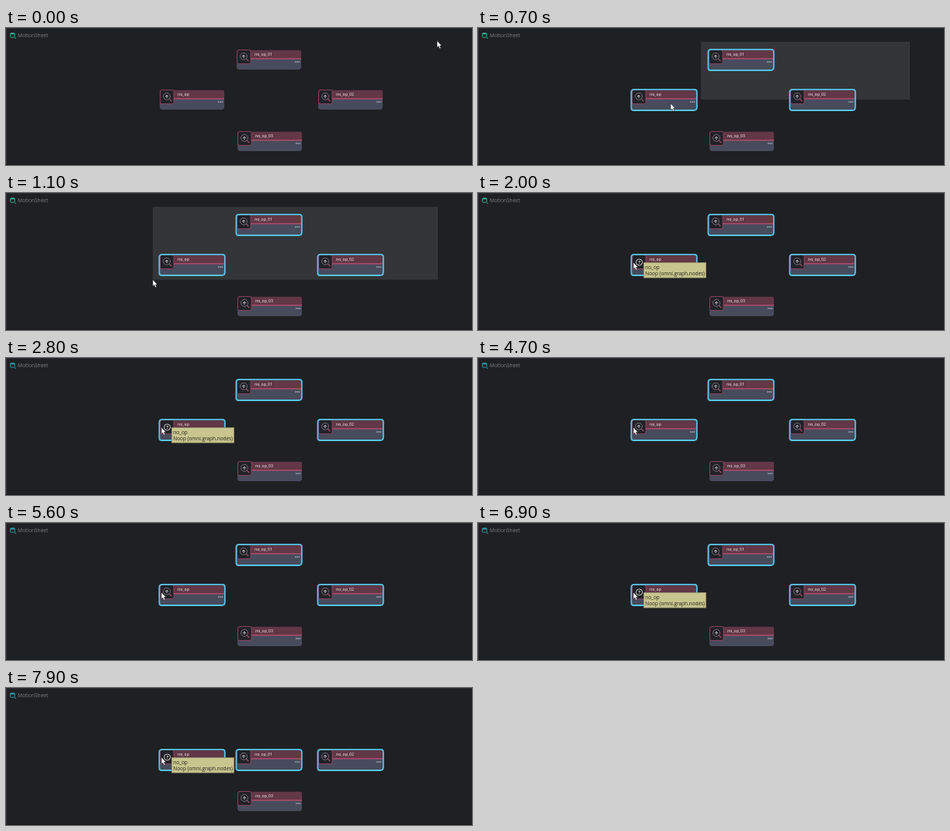
These frames come from a looping animation (600 by 178 pixels, 8000 ms). An HTML page:

```html
<!DOCTYPE html>
<html lang="en">
<head>
<meta charset="utf-8">
<title>Node selection</title>
<style>
  html, body { margin: 0; width: 100%; height: 100%; overflow: hidden; background: #1f2023; }
  svg { display: block; width: 600px; height: 178px; font-family: "Open Sans", sans-serif; }
</style>
</head>
<body>
<svg id="stage" viewBox="0 0 600 178"></svg>
<script>
const LOOP = 8000, STEP = 100;
const stage = document.getElementById('stage');

function add(parent, tag, attrs = {}, text = '') {
  const el = document.createElementNS('http://www.w3.org/2000/svg', tag);
  for (const key in attrs) el.setAttribute(key, attrs[key]);
  el.textContent = text;
  parent.append(el);
  return el;
}

const show = (el, on) => el.setAttribute('visibility', on ? 'visible' : 'hidden');
const move = (el, x, y) => el.setAttribute('transform', `translate(${x} ${y})`);

// Panel frame and title
add(stage, 'rect', { width: 600, height: 178, fill: '#1f2023' });
add(stage, 'rect', { width: 600, height: 1, fill: '#2b2c2f' });
add(stage, 'rect', { width: 1, height: 178, fill: '#353639' });
add(stage, 'rect', { y: 177, width: 600, height: 1, fill: '#18191b' });

const badge = add(stage, 'g', { fill: 'none', stroke: '#2fa58c' });
add(badge, 'rect', { x: 5.6, y: 6.6, width: 5.6, height: 5.6, rx: 1 });
add(badge, 'path', { d: 'M5.6 7.6h5.6', 'stroke-width': 1.6 });
add(badge, 'path', { d: 'M11.4 13.2h1.4', 'stroke-width': 1.4 });
add(stage, 'text', { x: 15, y: 12.1, 'font-size': 6.6, fill: '#7c7e7f' }, 'MotionSheet');

const marquee = add(stage, 'rect', { fill: '#343538' });

function makeNode(name, x, y) {
  const g = add(stage, 'g');
  add(g, 'path', { d: 'M0 12H83V24L81 26H3.5Q0 26 0 22.5Z', fill: '#474b5c' });
  add(g, 'path', { d: 'M2 .7H81Q83 .7 83 2.7V12H0V2.7Q0 .7 2 .7Z', fill: '#623746' });
  add(g, 'rect', { x: 18, y: 11.2, width: 65, height: 1.4, fill: '#b34c6d' });
  add(g, 'path', {
    d: 'M3 .5H16Q18 .5 18 2.5V16.5Q18 18.5 16 18.5H2.5Q.5 18.5 .5 16.5V3Q.5 .5 3 .5Z',
    fill: '#202228', stroke: '#934560', 'stroke-width': 0.9
  });

  const lens = add(g, 'g', { fill: 'none', stroke: '#8d7883' });
  add(lens, 'circle', { cx: 9, cy: 8.8, r: 4.5, 'stroke-width': 0.8 });
  add(lens, 'path', { d: 'M12.3 12.2L15.3 15.2', stroke: '#a5566f', 'stroke-width': 1.2 });
  add(lens, 'path', { d: 'M7.1 9.2L9 7.2L10.9 9.2M9 7.5V11', stroke: '#c9c5ca', 'stroke-width': 1 });

  const help = add(g, 'g');
  add(help, 'circle', { cx: 9.6, cy: 9.9, r: 4, fill: '#17181b', stroke: '#e4e4e6', 'stroke-width': 0.9 });
  add(help, 'text', {
    x: 9.6, y: 12.1, 'font-size': 6, 'font-weight': 700, fill: '#f0f0f0', 'text-anchor': 'middle'
  }, '?');

  add(g, 'text', { x: 23, y: 8.3, 'font-size': 5.1, 'font-weight': 600, fill: '#d3c7cc' }, name);
  for (let i = 0; i < 3; i++)
    add(g, 'rect', { x: 75 + i * 2.3, y: 15.4, width: 1.6, height: 1.3, fill: '#b6b9c4' });

  const ring = add(g, 'path', {
    d: 'M3 -.2H80.5Q83.8 -.2 83.8 2.8V23Q83.8 27 79.8 27H2.4Q-.6 27 -.6 24V3.4Q-.6 -.2 3 -.2Z',
    fill: 'none', stroke: '#55c5ea', 'stroke-width': 1.8
  });
  move(g, x, y);
  show(help, false);
  return { g, lens, help, ring };
}

const top1 = makeNode('no_op_01', 297, 28);
const left = makeNode('no_op', 198, 80);
const right = makeNode('no_op_02', 402, 80);
const low = makeNode('no_op_03', 298, 134);
show(low.ring, false);

const tip = add(stage, 'g');
add(tip, 'rect', { x: 213.4, y: 90.4, width: 80.2, height: 19.7, fill: '#c9c58e', stroke: '#8b8968', 'stroke-width': 0.8 });
for (const [y, line] of [[98.6, 'no_op'], [107.3, 'Noop (omni.graph.nodes)']])
  add(tip, 'text', { x: 215.3, y, 'font-size': 6.43, fill: '#25251d' }, line);

const cursor = add(stage, 'path', {
  d: 'M0 0V8.6L1.9 7L3.3 10.2L4.9 9.5L3.5 6.4H6Z',
  fill: '#fff', stroke: '#15161a', 'stroke-width': 0.5
});

// Pointer path: time, x, y
const path = [
  [0, 555, 16.6], [100, 556, 18], [300, 556, 18], [400, 528, 26], [500, 400, 62],
  [600, 287, 93], [700, 248, 98], [800, 216, 106], [900, 198, 111], [1000, 189, 112.6],
  [1100, 189, 112.6], [1200, 189, 107], [1300, 193, 99], [1400, 198, 92], [1500, 200, 90]
];

function pointer(t) {
  const i = path.findIndex(p => p[0] > t);
  if (i < 0) return path[path.length - 1].slice(1);
  if (i === 0) return path[0].slice(1);
  const [t0, x0, y0] = path[i - 1], [t1, x1, y1] = path[i];
  const k = (t - t0) / (t1 - t0);
  return [x0 + (x1 - x0) * k, y0 + (y1 - y0) * k];
}

function draw(t) {
  const [x, y] = pointer(t);
  move(cursor, x, y);

  // The marquee trails the pointer by one step
  const [mx, my] = pointer(t - STEP);
  show(marquee, t >= 400 && t < 1200);
  marquee.setAttribute('x', mx);
  marquee.setAttribute('y', 18);
  marquee.setAttribute('width', 556 - mx);
  marquee.setAttribute('height', Math.max(0, my - 18));

  show(right.ring, t >= 600);
  show(top1.ring, t >= 500);
  show(left.ring, t >= 700);

  const hover = (t >= 1900 && t < 3800) || t >= 6900;
  show(tip, hover);
  show(left.help, hover);
  show(left.lens, !hover);

  move(top1.g, 297, t < 7500 ? 28 : 80);
  badge.setAttribute('stroke', t < 2200 ? '#2fa58c' : '#2b96a8');
}

const start = performance.now();
function tick() {
  const t = Math.max(0, performance.now() - start) % LOOP;
  draw(Math.floor(t / STEP) * STEP);
  requestAnimationFrame(tick);
}
tick();
</script>
</body>
</html>
```
